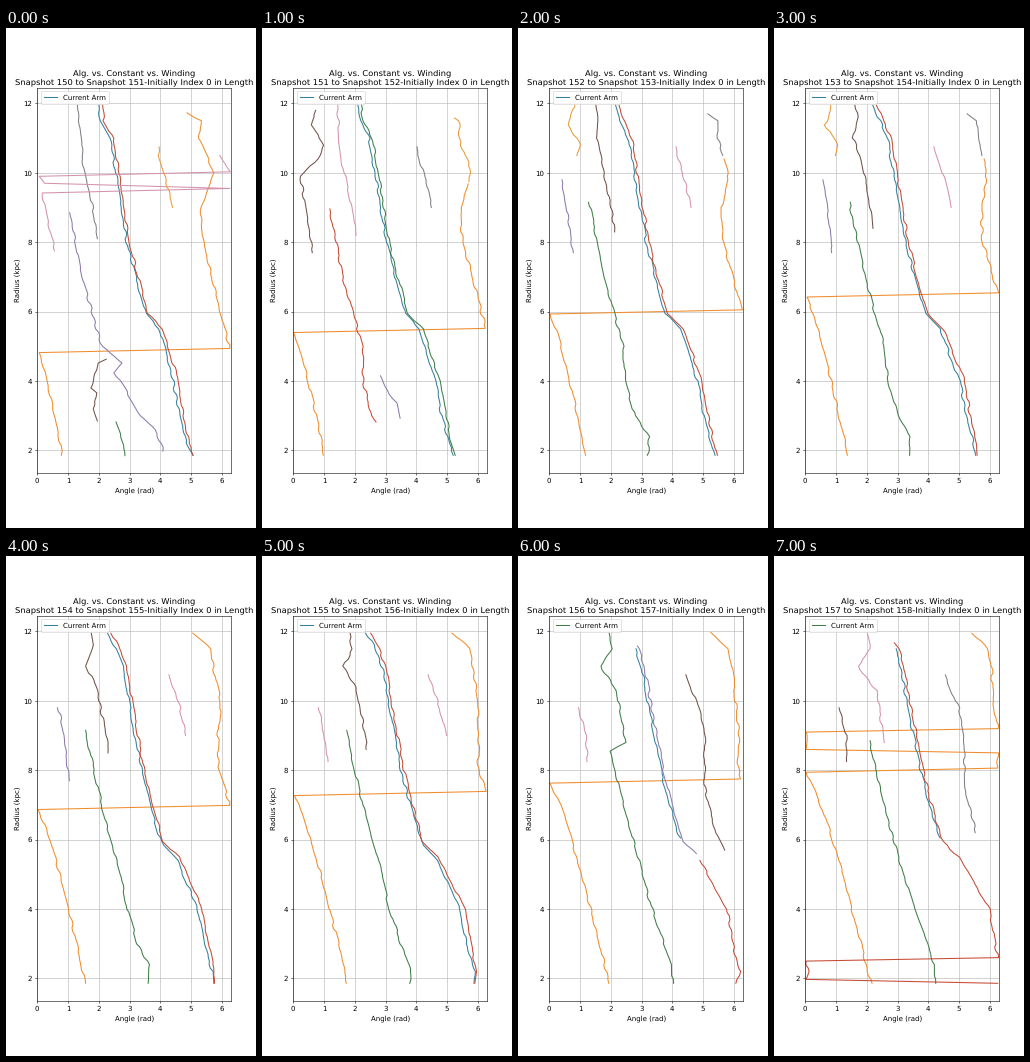
A matplotlib script that plays this animation: 250 by 500 pixels, repeating every 8 s.

```python
import numpy as np
import matplotlib.pyplot as plt
from matplotlib.animation import FuncAnimation

TAU = 2 * np.pi
FIRST = 150
COUNT = 8
INNER_EDGE = 1.86
COLORS = dict(
    blue="#34809c", orange="#f08c2c", green="#3f7d48", red="#c64a34",
    purple="#8c7aac", brown="#70524c", pink="#d492ac", gray="#7f7f88",
    amber="#e89a38",
)

# Every key point of an arm: radius, starting angle, rotation per snapshot.
MAIN = [(12, 1.98, .07), (11.5, 2.05, .125), (11, 2.36, .105), (10, 2.55, .105),
        (8, 2.91, .12), (7, 3.2, .118), (5.95, 3.52, .125), (5.5, 3.98, .13),
        (4, 4.42, .2), (3, 4.62, .2), (2.2, 4.85, .21), (1.86, 5.05, .165)]
SECOND = [(12, 1.33, .095), (11.5, 1.37, .11), (11, 1.46, .035), (10.3, 1.47, .12),
          (9.5, 1.68, .11), (8.8, 1.85, .105), (8.1, 1.95, .09)]
INNER = [(9.2, 1.0, .14), (7, 1.45, .16), (5, 2.1, .155), (4, 2.05, .215),
         (3, 2.3, .24), (2.4, 2.85, .19), (1.86, 2.8, .2)]
RIGHT = [(10.9, 3.9, .085), (10.5, 3.96, .1), (9.8, 4.18, .115), (9, 4.4, .11),
         (7.5, 4.3, .125), (6.2, 4.7, .12), (5.7, 4.95, .125)]
LEFT = [(11.9, .75, .03), (11.38, .5, .05), (10.8, 1, .01), (10.5, .85, .03),
        (9.9, .1, .14), (9, .25, .155), (7.6, .55, .12)]
RIM = [(11.97, 4.5, .13), (11.5, 5.3, .09), (11, 5.25, .115), (10, 5.75, .05),
       (9, 5.3, .145), (8.1, 5.36, .128)]


def trail(keys, t, top, bottom):
    """Angle and radius of an arm at snapshot t, cut to a radius range."""
    r, start, rate = np.array(keys[::-1]).T
    inside = r[(r > bottom) & (r < top)]
    radii = np.r_[top, inside[::-1], bottom]
    return np.column_stack([np.interp(radii, r, start + rate * t), radii])


def main(t, top=11.95, bottom=INNER_EDGE):
    return trail(MAIN, t, top, bottom)


def wind(t, top=11.95, bottom=INNER_EDGE):
    """The main arm a little ahead, most of all near the centre."""
    pts = main(t, top, bottom)
    pts[:, 0] += np.interp(pts[:, 1], [1.9, 2.2, 3.5, 5, 6, 12],
                           [.05, .08, .18, .12, .07, .12])
    return pts


def rim(t, top):
    """Outer arm that passes 2 pi at a radius growing with time."""
    cross = 4.88 + .6 * t - .022 * t * t
    end = .78 + .19 * t
    upper = trail(RIM, t, top, 8.1)
    radii = np.linspace(cross - .06, INNER_EDGE, 12)
    lower = np.column_stack([TAU + .03 + end * np.linspace(0, 1, 12) ** .8, radii])
    return np.vstack([upper, [(TAU - .03, cross + .06)], lower])


def snapshot(t):
    """Colour and key points of all arms."""
    rim_top = [11.73, 9.68, 10.4, 10.4, 11.95, 11.95, 11.97, 11.95][t]
    arms = [("orange", rim(t, rim_top))]

    if t < 6:
        arms += [("blue", main(t)), ("green" if t == 1 else "red", wind(t))]
    else:
        arms.append(("blue", main(t, 11.5, 6.05)))
    if t == 6:
        arms += [("purple", wind(t, 11.58, 5.6)), ("red", wind(t, 5.4)),
                 ("green", np.vstack([trail(SECOND, t, 11.95, 8.8),
                                      trail(INNER, t, 8.55, INNER_EDGE)]))]
    else:
        color = ["gray", "pink", "brown", "brown", "brown", "brown", "", "pink"][t]
        arms.append((color, trail(SECOND, t, 11.95, 8.1 + .1 * t)))
    if t == 7:
        arms.append(("red", wind(t, 11.67)))

    if t == 0:
        tail = [(2.78, 4.52), (2.52, 4.23), (2.85, 3.8), (3.36, 3), (3.75, 2.7),
                (4.11, 1.98)]
        loop = [(5.93, 10.5), (6.25, 10.03), (6.32, 9.9), (6.48, 9.7), (6.25, 9.55),
                (6.44, 9.42), (6.5, 9.1), (6.66, 8.4), (6.88, 7.75)]
        arms += [("purple", np.vstack([trail(INNER, t, 8.85, 5), tail])),
                 ("pink", loop),
                 ("brown", [(2.23, 4.63), (1.97, 4.52), (1.78, 3.8), (1.97, 3.66),
                            (1.78, 3.2), (1.92, 2.85)]),
                 ("green", [(2.55, 2.82), (2.78, 2.25), (2.81, 1.85)])]
    elif t == 1:
        arms += [("red", trail(INNER, t, 8.96, 2.82)),
                 ("purple", [(2.84, 4.15), (3.1, 3.63), (3.4, 3.37), (3.5, 2.93)]),
                 ("amber", trail(RIM, t, 11.58, 9.75))]
    elif t != 6:
        arms.append(("green", trail(INNER, t, 8.85 if t == 7 else 9.15, INNER_EDGE)))

    right = ["amber", "gray", "pink", "pink", "pink", "pink", "brown", "gray"][t]
    arms.append((right, trail(RIGHT, t, 10.75, [9, 5.7, 6.2][max(0, t - 5)])))
    if t:
        left = ["brown", "purple", "purple", "purple", "pink", "pink", "brown"][t - 1]
        top = 11.8 if t == 1 else 9.8
        arms.append((left, trail(LEFT, t, top, 7.7 if t < 5 else 8.25)))
    if t in (2, 3):
        arms += [("amber", trail(LEFT, t, 11.95, 10.5)),
                 ("gray", trail(RIM, t, 11.7, 10.5))]
    return arms


def roughen(pts, rng, step=.1):
    """Fill in small stair-like steps, then wrap the angle."""
    pts = np.array(pts)
    out = []
    for p, q in zip(pts[:-1], pts[1:]):
        n = max(1, round(abs(q[1] - p[1]) / step - .3))
        out.extend(p + (q - p) * k / n for k in range(n))
    theta, r = np.array(out + [pts[-1]]).T
    noise = np.repeat(rng.uniform(-.04, .04, len(r) // 2 + 1), 2)[:len(r)]
    moved = theta + noise
    theta = np.where(moved // TAU == theta // TAU, moved, theta)
    return theta % TAU, r


plt.rcParams["text.hinting"] = "no_hinting"
fig, ax = plt.subplots(figsize=(5, 10), dpi=50)


def draw(t):
    rng = np.random.default_rng(FIRST + t)
    ax.clear()
    for color, pts in snapshot(t):
        ax.plot(*roughen(pts, rng), color=COLORS[color])
    current = "green" if t >= 6 else "blue"
    ax.plot([], [], color=COLORS[current], label="Current Arm")
    ax.set(xlim=(0, 6.295), ylim=(1.35, 12.445),
           xlabel="Angle (rad)", ylabel="Radius (kpc)")
    ax.set_title("Alg. vs. Constant vs. Winding\n"
                 f"Snapshot {FIRST + t} to Snapshot {FIRST + t + 1}"
                 "-Initially Index 0 in Length")
    ax.grid(True)
    ax.legend(loc="upper left")
    return []


anim = FuncAnimation(fig, draw, frames=COUNT, interval=1000,
                     init_func=lambda: [], repeat=True)
plt.show()
```
